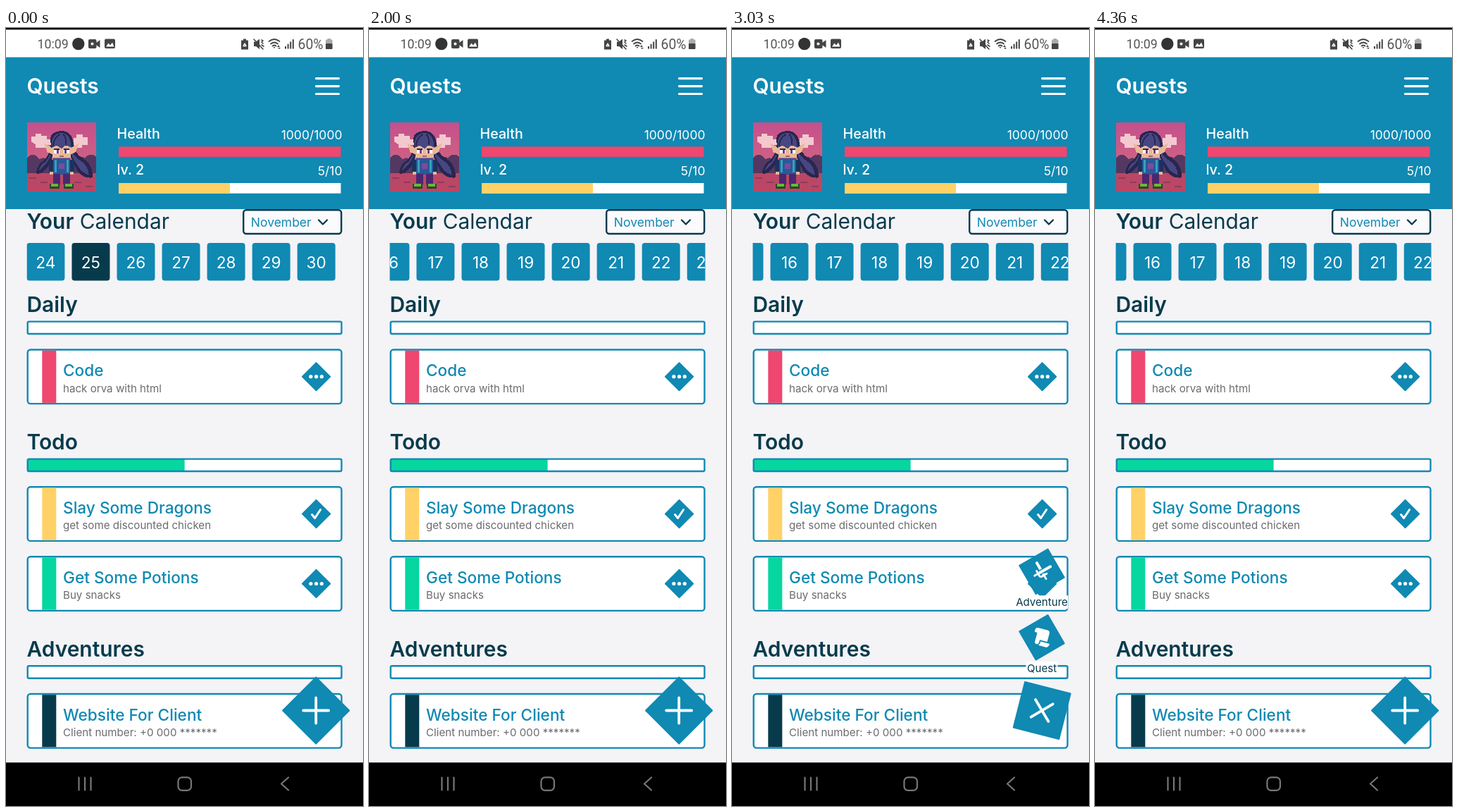
Animation, 507 px wide and 1104 px high, one loop 4390 ms. Source, as an HTML page:

```html
<!DOCTYPE html>
<html lang="en">
<head>
<meta charset="utf-8">
<title>Quests</title>
<style>
  html, body { margin: 0; width: 100%; height: 100%; overflow: hidden; background: #f4f3f6; }
  svg { display: block; width: 507px; height: 1104px; }
  text { font-family: Inter, sans-serif; font-optical-sizing: none; white-space: pre; }
  .status { font-family: Roboto, sans-serif; fill: #555; }
  .heading { font-size: 29.9px; font-weight: 600; }
  .title { font-size: 22.65px; font-weight: 500; }
  .stat { font-size: 19.7px; font-weight: 500; }
  .small { font-size: 17.5px; }
  .note { font-size: 15.15px; fill: #6c6c70; }
  .line { fill: none; stroke-linecap: round; stroke-linejoin: round; }
</style>
</head>
<body>
<svg id="stage" viewBox="0 0 507 1104" xmlns="http://www.w3.org/2000/svg"></svg>
<script>
const BLUE = '#1089b3', NAVY = '#073b4c', RED = '#ef476f', YELLOW = '#ffd166', GREEN = '#06d6a0';
const LOOP = 4390, DAY_PITCH = 64.05;
const stage = document.getElementById('stage');

const rect = (x, y, w, h, fill, extra = '') =>
  `<rect x="${x}" y="${y}" width="${w}" height="${h}" fill="${fill}" ${extra}/>`;
const text = (x, y, content, cls, fill, extra = '') =>
  `<text x="${x}" y="${y}" class="${cls}" fill="${fill}" ${extra}>${content}</text>`;
const line = (d, color, width) =>
  `<path d="${d}" class="line" stroke="${color}" stroke-width="${width}"/>`;
const shape = (d, fill) => `<path d="${d}" fill="${fill}"/>`;
const diamond = (r) => {
  const side = r * Math.SQRT2;
  return rect(-side / 2, -side / 2, side, side, BLUE, 'rx="1" transform="rotate(45)"');
};
const at = (x, y, content) => `<g transform="translate(${x} ${y})">${content}</g>`;

function statusBar() {
  const gray = '#444';
  return rect(0, 0, 507, 3, '#000') + rect(0, 2.3, 507, 39.2, '#fff') +
    text(44.5, 29.3, '10:09', 'status', '', 'font-size="17.8"') +
    `<circle cx="102.8" cy="22.5" r="8.7" fill="#333"/>` +
    rect(117, 16, 11.5, 13, gray, 'rx="2"') + shape('M128 21 l5.5 -4 v11 l-5.5 -4z', gray) +
    `<circle cx="122.5" cy="22.5" r="2" fill="#fff"/>` +
    rect(140, 15.5, 15, 13.5, gray, 'rx="2"') +
    shape('M142 26.5 l3.5 -5 2.5 3 3 -4 2.5 6z', '#fff') +
    shape('M334 17.5 h3 v-2 h4 v2 h3 v13 h-10z', gray) +
    line('M337 25.5 l2 -3.5 2 3.5z', '#fff', 1.4) +
    shape('M352 19.5 h3 l5 -4 v14.5 l-5 -4 h-3z', gray) +
    line('M352 16 L365 30 M363 17 l2 1 -2 2 2 2 M363 24 l3 2', gray, 1.6) +
    line('M373.5 19 q7.5 -6 15 0 M376 22.5 q5 -4 10 0 M378.5 25.5 q2.5 -2 5 0', gray, 1.7) +
    shape('M379.5 27 h3 l-1.5 2z M385 27 l2 -3 2 3z M386 28 h4 l-2 2z', gray) +
    [0, 1, 2, 3].map(i => rect(396 + i * 3.6, 26 - i * 3.3, 2, 3.5 + i * 3.3, gray)).join('') +
    text(414.5, 29.5, '60%', 'status', '', 'font-size="19.4"') +
    rect(454, 16.5, 9.5, 13.5, '#aaa', 'rx="1"') + rect(456.5, 15, 4.5, 2, '#aaa') +
    rect(454, 22, 9.5, 8, gray, 'rx="1"');
}

function avatar() {
  const mirrored = (x, y, w, h, fill) => rect(x, y, w, h, fill) + rect(98 - x - w, y, w, h, fill);
  const hairDark = '#29264f', hair = '#464783', skin = '#e9b896';
  return at(29.8, 134.3, `<g shape-rendering="crispEdges">` +
    rect(0, 0, 98.5, 98, 'url(#sky)') +
    shape('M6 27 v-7 h6 v-4 h8 v3 h8 v5 h7 v8 h-6 v4 h-17 v-5z M66 30 v-8 h4 v-5 h9 v4 h7 v11 h-8 v4 h-9z', '#f3c9cf') +
    shape('M0 50 q9 -10 18 2 q8 -6 14 6 h36 q6 -14 14 -8 q8 -8 16 -2 v28 H0z', '#553862') +
    rect(0, 72, 98.5, 26, '#ba4765') +
    [0, 1, 2, 3, 4, 5].map(i => rect(3 + i * 16, 78 + i % 3 * 6, 10, 2, '#8f3b5e')).join('') +
    // Flowing hair behind the figure
    shape('M34 30 Q30 14 46 12 Q64 10 66 30 Q67 44 80 51 Q94 60 93 78 Q80 80 71 68 L62 48 H36 Q34 60 26 66 Q21 74 13 72 Q14 60 23 54 Q33 46 34 30z', hairDark) +
    shape('M61 32 Q64 47 76 54 Q87 61 88 74 Q78 72 72 61 Q62 48 61 32z M34 43 Q32 56 22 63 L17 69 Q18 60 27 55z', hair) +
    // Ears, face and fringe
    shape('M24 29 L36 36 V45 L29 42z M74 29 L62 36 V45 L69 42z', skin) +
    rect(36, 33, 26, 17, skin) +
    shape('M35 36 Q33 18 46 15 Q62 13 63 36 L55 31 L49 37 L42 32z', hair) +
    line('M46 17 Q38 22 37 33 M52 17 Q56 22 55 30', hairDark, 2) +
    mirrored(38, 38, 8, 6, '#fff') + mirrored(38, 37, 8, 2, hairDark) + mirrored(42, 39, 3, 5, '#6e3d83') +
    rect(46, 47, 6, 2, '#a85f62') +
    // Clothes
    mirrored(31, 53, 8, 19, '#1d315e') + rect(37, 51, 24, 23, '#28599a') +
    mirrored(39, 53, 3, 18, '#36a1ba') + rect(45, 58, 8, 8, '#7d4b9b') +
    mirrored(32, 70, 5, 4, skin) +
    mirrored(37, 73, 10, 15, '#4b276f') + mirrored(32, 87, 14, 7, '#2b4532') +
    mirrored(34, 87, 10, 4, '#68b839') + `</g>`);
}

function header() {
  return rect(0, 41.5, 507, 215.5, BLUE) +
    text(29.5, 93, 'Quests', 'heading', '#fff') +
    line('M440.5 71.6 H472.5 M440.5 82.6 H472.5 M440.5 93.5 H472.5', '#fff', 3.2) + avatar() +
    text(157.5, 156.5, 'Health', 'stat', '#fff') +
    text(477.5, 157.5, '1000/1000', 'small', '#fff', 'text-anchor="end"') +
    rect(160, 168.3, 315.5, 14.6, RED) +
    text(157.5, 208, 'lv. 2', 'stat', '#fff') +
    text(477.5, 209, '5/10', 'small', '#fff', 'text-anchor="end"') +
    rect(160, 220, 315.5, 14.7, '#fff') + rect(160, 220, 158, 14.7, YELLOW);
}

function calendar() {
  let days = '';
  for (let day = 14; day <= 30; day++) {
    const x = 29.4 + (day - 24) * DAY_PITCH;
    days += rect(x, 305, 54, 53.5, day === 25 ? NAVY : BLUE, 'rx="4"') +
      text(x + 27, 341, day, '', '#fff', 'font-size="22.65" text-anchor="middle"');
  }
  return text(29.5, 285, 'Your<tspan font-weight="400"> Calendar</tspan>', 'heading', NAVY) +
    rect(337.2, 258.2, 139, 33.8, '#fbfafc', `rx="4" stroke="${NAVY}" stroke-width="2.4"`) +
    text(347.8, 281.7, 'November', 'small', BLUE) +
    line('M444 272.5 l6 6 6 -6', NAVY, 2.4) +
    `<g clip-path="url(#dayClip)"><g id="days">${days}</g></g>`;
}

function section(name, y, progress = 0) {
  const top = y + 13.6;
  return text(29.5, y, name, 'heading', NAVY) + rect(31, top, 445.3, 17.4, '#fff') +
    rect(31, top, 445.3 * progress, 17.4, GREEN) +
    rect(30.7, top, 445.8, 17.4, 'none', `rx="2" stroke="${BLUE}" stroke-width="2.4"`);
}

function card(y, color, title, note, done) {
  const mark = done
    ? line('M-6 1 l4 5 8 -12', '#fff', 3)
    : [-7.7, 0, 7.7].map(x => `<circle cx="${x}" r="2.6" fill="#fff"/>`).join('');
  return rect(30.7, y, 445.8, 76.6, '#fff', `rx="4" stroke="${BLUE}" stroke-width="2.4"`) +
    rect(51.3, y + 1.2, 20, 74.2, color) +
    text(81, y + 37.5, title, 'title', BLUE) + text(81, y + 60, note, 'note', '') +
    at(440.6, y + 38.2, diamond(21) + mark);
}

function menuItem(y, name, labelWidth, icon) {
  return at(440, y, `<g class="badge">${diamond(34.3)}${icon}</g>` +
    rect(-labelWidth / 2, 34, labelWidth, 19, '#fff') +
    text(0, 48.8, name, '', NAVY, 'font-size="15.1" text-anchor="middle"'));
}

const sword = line('M0 -14 V3', BLUE, 7) + line('M0 -14 V3', '#fff', 4) +
  line('M-4.5 6 H4.5 M0 6 V12', '#fff', 2.8);
const swords = `<g transform="rotate(-45)">${sword}</g><g transform="rotate(45)">${sword}</g>`;
const scroll = shape('M-12 -8 q0 -4 4 -4 h13 q4 0 4 4 v12 h-11 v4 q0 3 -3 3 t-3 -3 V-5 h-4z ' +
  'M0 6 h13 q0 6 -5 6 h-10 q2 -2 2 -6z', '#fff');

const navBar = rect(0, 1042.3, 507, 62, '#000') +
  line('M103.5 1063.5 V1081.5 M112 1063.5 V1081.5 M120.5 1063.5 V1081.5 M401 1063.5 L391 1072.5 L401 1081.5', '#777', 2.2) +
  rect(244.5, 1063.3, 18.5, 18.5, 'none', 'rx="5.5" stroke="#777" stroke-width="2.2"');

stage.innerHTML = `<defs>
    <clipPath id="dayClip"><rect x="29.5" y="300" width="448" height="64"/></clipPath>
    <linearGradient id="sky" x2="0" y2="1"><stop stop-color="#c4508c"/><stop offset="1" stop-color="#d76f7d"/></linearGradient>
  </defs>` +
  rect(0, 0, 507, 1104, '#f4f3f6') + statusBar() + header() + calendar() +
  section('Daily', 403) + card(456.5, RED, 'Code', 'hack orva with html') +
  section('Todo', 598, 0.5) +
  card(651.3, YELLOW, 'Slay Some Dragons', 'get some discounted chicken', true) +
  card(750.3, GREEN, 'Get Some Potions', 'Buy snacks') +
  section('Adventures', 891.7) +
  card(945, NAVY, 'Website For Client', 'Client number: +0 000 *******') +
  `<g id="menu">${menuItem(772.3, 'Adventure', 75, swords)}${menuItem(865.8, 'Quest', 45, scroll)}</g>` +
  `<g id="fab">${diamond(48.5)}${line('M-18 0 H18 M0 -18 V18', '#fff', 3.8)}</g>` + navBar;

const [days, menu, fab] = ['days', 'menu', 'fab'].map(id => document.getElementById(id));
const badges = document.querySelectorAll('.badge');

const clamp = v => Math.min(1, Math.max(0, v));
const easeInOut = v => (v = clamp(v)) < 0.5 ? 2 * v * v : 1 - 2 * (1 - v) ** 2;

// Underdamped step response, settling at 1.
function spring(ms) {
  const damping = 0.725, tau = 9 * ms / 1000, freq = Math.sqrt(1 - damping ** 2);
  return 1 - Math.exp(-damping * tau) *
    (Math.cos(freq * tau) + damping / freq * Math.sin(freq * tau));
}

function openness(t) {
  if (t < 2565 || t >= 4360) return 0;
  if (t < 3240) return spring(t - 2565);
  return t < 3785 ? 1 : 1 - spring(t - 3785);
}

const press = (t, down, up) => easeInOut((t - down) / 150) * (1 - easeInOut((t - up) / 250));

function draw(t) {
  const shift = t < 1820 ? 0 : 537.5 - 197.7 * clamp((2240 - t) / 420) ** 2.4;
  days.setAttribute('transform', `translate(${shift} 0)`);

  const open = openness(t);
  menu.setAttribute('opacity', clamp(open) ** 2.3);
  menu.setAttribute('transform', `translate(0 ${30 * (1 - open)})`);
  badges.forEach(b => b.setAttribute('transform', `rotate(${12.3 - 77 * (1 - open)})`));
  fab.setAttribute('transform', `translate(440.2 968.5) rotate(${57.3 * open})`);
  fab.setAttribute('opacity', 1 - 0.8 * (press(t, 2415, 2540) + press(t, 3635, 3775)));
}

const start = performance.now();
function frame() {
  draw((performance.now() - start) % LOOP);
  requestAnimationFrame(frame);
}
frame();
</script>
</body>
</html>
```
